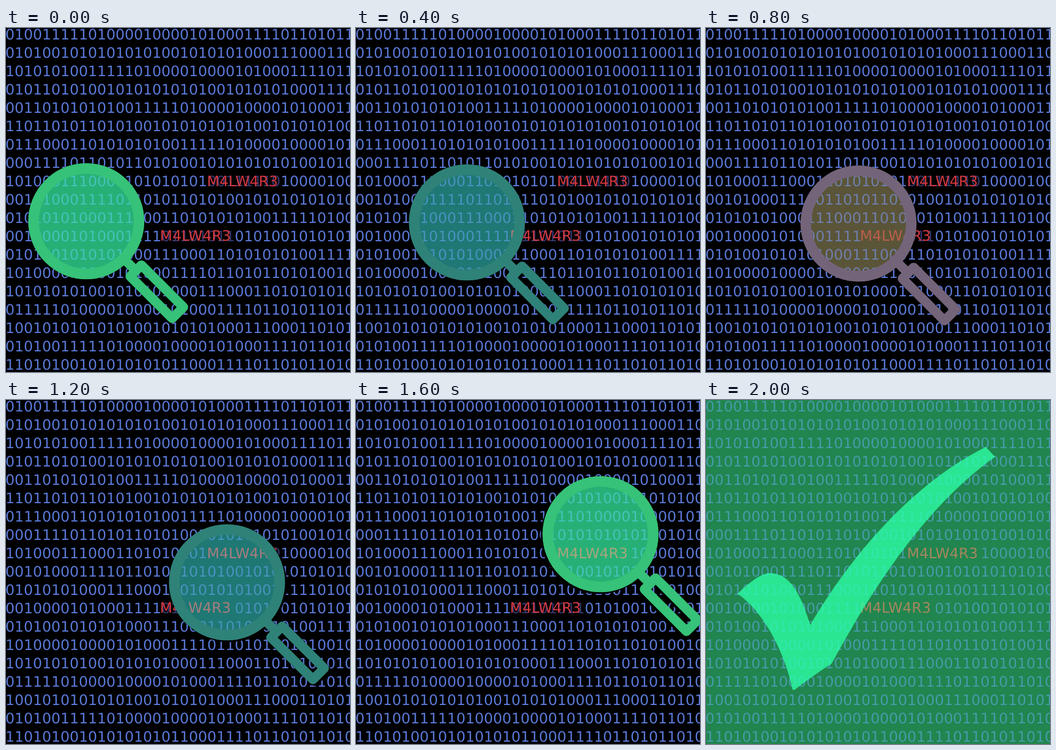
An HTML page for the animation above (2.4 s loop, 600 by 600 pixels).

```html
<!DOCTYPE html>
<html lang="en">
<head>
<meta charset="utf-8">
<title>Malware scan</title>
<style>
html, body { margin: 0; width: 100%; height: 100%; overflow: hidden; background: #000; }
svg { display: block; width: 100vw; height: 100vh; }
text { font: 25.15px "DejaVu Sans", sans-serif; text-rendering: geometricPrecision; white-space: pre; }
.bits { fill: var(--bits); }
.veiled { fill: var(--veiled); }
.word { fill: var(--word); }
</style>
</head>
<body>
<svg viewBox="0 0 600 600">
  <defs>
    <clipPath id="glassClip"><circle id="hole" r="92"/></clipPath>
    <path id="tick" d="M55 338C82 312 99 302 112 302C152 303 168 350 182 392C250 275 360 145 488 82L504 99C385 185 295 320 219 460Q187 480 154 506L151 505C140 450 105 372 55 338Z"/>
    <clipPath id="tickClip"><use href="#tick"/></clipPath>
    <g id="frame" fill="none" stroke-linejoin="round">
      <circle r="92" stroke-width="18.5"/>
      <g transform="rotate(45)" stroke-width="16.5">
        <path d="M94 0H122"/>
        <rect x="122.2" y="-13.8" width="103.6" height="27.6"/>
      </g>
    </g>
  </defs>
  <rect id="back" width="600" height="600"/>
  <g id="page"></g>
  <g id="scan">
    <use id="shade" href="#frame" stroke="#000"/>
    <g clip-path="url(#glassClip)">
      <rect id="glass" width="600" height="600"/>
      <g id="seen"></g>
    </g>
    <use id="rim" href="#frame"/>
  </g>
  <g id="done">
    <use href="#tick" fill="#2ae592"/>
    <g id="ticked" clip-path="url(#tickClip)"></g>
  </g>
</svg>
<script>
const $ = id => document.getElementById(id);
const NS = "http://www.w3.org/2000/svg";
const STEP = 400;
const COLS = 38;
const STREAM =
  "01001111101000010000101000111101101011" +
  "01010010101010101001010101000111000110" + "10101";
const LAST_ROW = "11010100101010101011000111101101011010";
const WORD = "M4LW4R3";
const words = [
  { row: 8, col: 22, x: 350.5, y: 276 },
  { row: 11, col: 17, x: 268.5, y: 371 }
];

const teal = { rim: "#2f8278", glass: "#1f7874", bits: "#4992be", word: "#a77d7e" };
const green = { rim: "#36c278", glass: "#27b076", bits: "#45c2b8", word: "#a7a67e" };
const brown = { rim: "#74647a", glass: "#5a5538", bits: "#707eac", word: "#bb5f4c" };
const poses = [
  { x: 140, y: 337, tint: green },
  { x: 193.5, y: 339, tint: teal },
  { x: 266, y: 341, tint: brown },
  { x: 385.5, y: 318, tint: teal, shade: [3, 3] },
  { x: 426.5, y: 234, tint: green, shade: [-3, 3] }
];
const dark = { bits: "#5a79d9", veiled: "#35376f", word: "#d4383f" };
const clean = { bits: "#459ca8", veiled: "transparent", word: "#a6875f" };

function add(parent, tag, cls, attrs, text = "") {
  const el = document.createElementNS(NS, tag);
  el.setAttribute("class", cls);
  for (const key in attrs) el.setAttribute(key, attrs[key]);
  el.textContent = text;
  parent.append(el);
  return el;
}

function rowBits(row) {
  if (row === 18) return LAST_ROW;
  const start = row * COLS % STREAM.length;
  return (STREAM + STREAM).slice(start, start + COLS);
}

function fillText(layer) {
  for (let row = 0; row < 19; row++) {
    const bits = rowBits(row);
    const line = add(layer, "text", "bits", { x: -1, y: 20 + row * 32 });
    const hit = words.find(w => w.row === row);
    if (!hit) {
      line.textContent = bits;
      continue;
    }
    const end = hit.col + 8;
    add(line, "tspan", "bits", {}, bits.slice(0, hit.col));
    add(line, "tspan", "veiled", {}, bits.slice(hit.col, end));
    add(line, "tspan", "bits", {}, bits.slice(end));
  }
  for (const { x, y } of words) add(layer, "text", "word", { x, y }, WORD);
}

function paint(layer, { bits, veiled = "transparent", word }) {
  layer.style.setProperty("--bits", bits);
  layer.style.setProperty("--veiled", veiled);
  layer.style.setProperty("--word", word);
}

const move = (el, x, y) => el.setAttribute("transform", `translate(${x} ${y})`);

function show(step) {
  const pose = poses[step];
  $("scan").style.display = pose ? "" : "none";
  $("done").style.display = pose ? "none" : "";
  $("back").setAttribute("fill", pose ? "#000" : "#21854f");
  paint($("page"), pose ? dark : clean);
  if (!pose) return;
  const { x, y, tint, shade: [dx, dy] = [0, 0] } = pose;
  move($("hole"), x, y);
  move($("rim"), x, y);
  move($("shade"), x + dx, y + dy);
  $("rim").setAttribute("stroke", tint.rim);
  $("glass").setAttribute("fill", tint.glass);
  paint($("seen"), tint);
}

["page", "seen", "ticked"].forEach(id => fillText($(id)));
paint($("ticked"), { bits: "#31e8ac", word: "#45e596" });

const start = performance.now();
let current = -1;
function tick(now) {
  const step = Math.floor(Math.max(0, now - start) / STEP) % (poses.length + 1);
  if (step !== current) show(current = step);
  requestAnimationFrame(tick);
}
tick(start);
</script>
</body>
</html>
```
